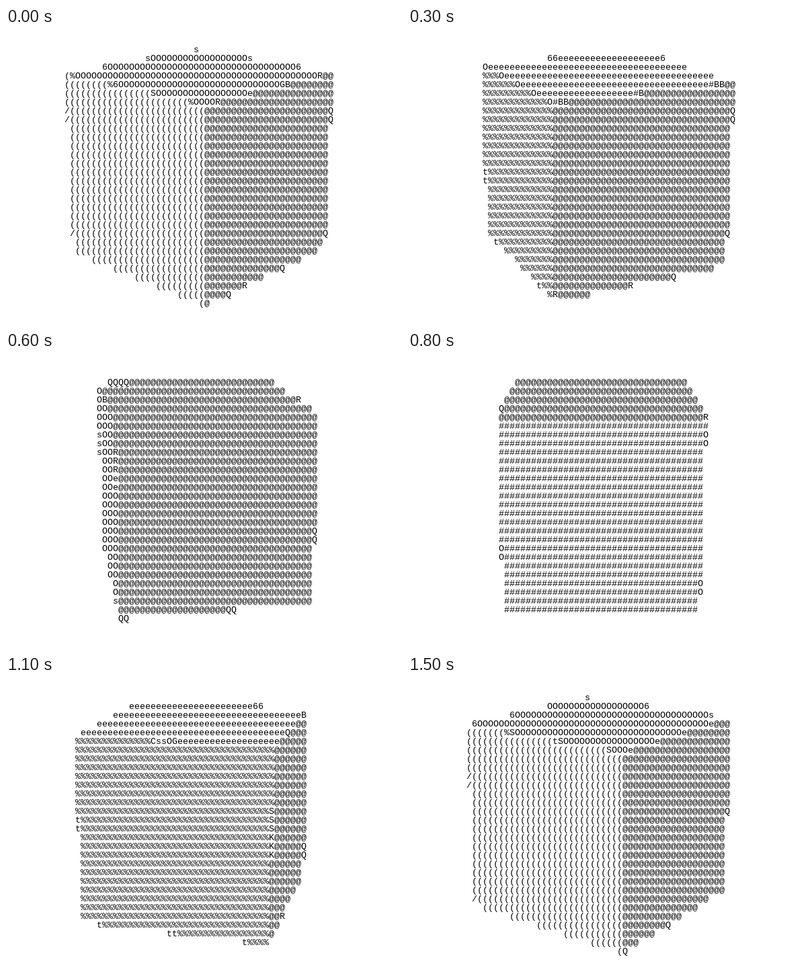
Animation of 589 by 440 pixels, one loop 1.6 s. Source, as an HTML page with a canvas:

```html
<!DOCTYPE html>
<html lang="en">
<head>
<meta charset="utf-8">
<title>ASCII cube</title>
<style>
  html, body { margin: 0; width: 100%; height: 100%; overflow: hidden; background: #fff; }
  canvas { display: block; }
</style>
</head>
<body>
<canvas id="stage" width="589" height="440"></canvas>
<script>
const ctx = document.getElementById('stage').getContext('2d');
const RAMP = ' ^~/(t%CsS6OGeQ#KRB@';
const STEP_MS = 100;

// Per step: angle of the nearest vertical edge, and the shade of the lid and left side.
const ANGLES = [2, -6, -14.4, -19, -23.5, -29, -34.3, -40, 45, 39.5, 34, 29, 23.5, 18.5, 13, 8];
const LID  = 'OOee##@@@@#eOOOO';
const LEFT = '(((%%OO##eO%%(((';

const COLS = 73, ROWS = 30, CELL_W = 8, CELL_H = 13;
const CENTER = { x: 288, y: 202 };
const DISTANCE = 7, FOCUS = 1353, HALF_HEIGHT = 0.71;
const SIN = 0.3, COS = 0.954;

function project(degrees, height) {
  const a = degrees * Math.PI / 180;
  const x = Math.sin(a), z = Math.cos(a);
  const scale = FOCUS / (DISTANCE - z * COS - height * SIN);
  return [CENTER.x + x * scale, CENTER.y - (height * COS - z * SIN) * scale];
}

// True inside a clockwise polygon; faces turned away never match.
function inside(face, x, y) {
  return face.every(([ax, ay], i) => {
    const [bx, by] = face[(i + 1) % face.length];
    return (bx - ax) * (y - ay) - (by - ay) * (x - ax) > 0;
  });
}

function buildFaces(step) {
  const corner = (turn, side) => project(ANGLES[step] + turn, side * HALF_HEIGHT);
  const wall = (from, to) => [corner(from, 1), corner(to, 1), corner(to, -1), corner(from, -1)];
  return [
    { face: [180, 90, 0, -90].map(turn => corner(turn, 1)), level: RAMP.indexOf(LID[step]) },
    { face: wall(-90, 0), level: RAMP.indexOf(LEFT[step]) },
    { face: wall(0, 90), level: RAMP.indexOf('@') }
  ];
}

function draw(step) {
  const faces = buildFaces(step);
  const shade = (x, y) => {
    const hit = faces.find(f => inside(f.face, x, y));
    return hit ? hit.level : 0;
  };
  const cell = (x, y) => {
    const middle = shade(x, y);
    if (!middle) return ' ';
    const around = shade(x - 1, y - 1) + shade(x + 1, y - 1)
                 + shade(x - 1, y + 1) + shade(x + 1, y + 1);
    return RAMP[Math.round((4 * middle + around) / 8)];
  };

  ctx.fillStyle = '#fff';
  ctx.fillRect(0, 0, 589, 440);
  ctx.fillStyle = '#000';
  ctx.font = '13.333px "Liberation Mono", monospace';
  for (let row = 0; row < ROWS; row++) {
    const y = 32 + row * CELL_H;
    for (let col = 0; col < COLS; col++) {
      const x = col * CELL_W - 1;
      const glyph = cell(x + CELL_W / 2, y);
      if (glyph !== ' ') ctx.fillText(glyph, x, y + 4);
    }
  }
}

let shown = -1;
function tick() {
  const step = Math.floor(performance.now() / STEP_MS) % ANGLES.length;
  if (step !== shown) draw(shown = step);
  requestAnimationFrame(tick);
}
tick();
</script>
</body>
</html>
```
